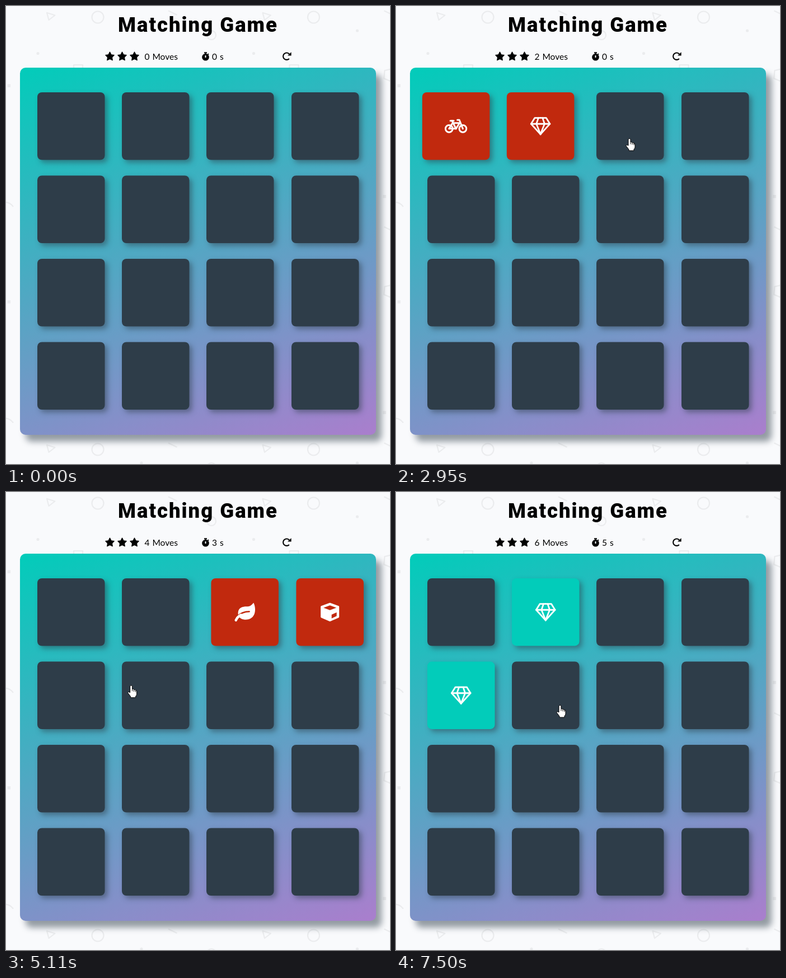
Recreate the animation shown at these times as an HTML page with a canvas. Size 686x817 px, loop 8 s.

```html
<!DOCTYPE html>
<html lang="en">
<head>
<meta charset="utf-8">
<title>Matching Game</title>
<style>
  html, body { margin: 0; width: 100%; height: 100%; overflow: hidden; background: #f9fafc; }
  canvas { display: block; }
</style>
</head>
<body>
<canvas id="stage" width="686" height="817"></canvas>
<script>
const W = 686, H = 817, LOOP = 8000;
const ctx = document.getElementById('stage').getContext('2d');
const PAPER = '#f9fafc', FAINT = '#ebecee', SHADOW = 'rgba(46,61,73,0.5)';
const DARK = '#2e3d49', BLUE = '#02b3e4', RED = '#c1290e', TEAL = '#02ccba';
const SIZE = 120.5, FLIP = 300, JUDGE = 370, EFFECT = 1000;

const faces = ['bike', 'gem', 'leaf', 'cube', 'gem'];
const pairs = [
  { cards: [0, 1], opens: [1450, 2075] },
  { cards: [2, 3], opens: [3060, 4175] },
  { cards: [4, 1], opens: [5680, 6170] }
];
const plays = pairs.flatMap(({ cards, opens }) => cards.map((card, i) => ({
  card, open: opens[i], judge: opens[1] + JUDGE,
  match: faces[cards[0]] === faces[cards[1]]
})));

// Pointer glides: departure, arrival, goal
const glides = [
  { from: 700, to: 1080, x: 137, y: 187 },
  { from: 1460, to: 1620, x: 231, y: 201 },
  { from: 2450, to: 2950, x: 417, y: 236 },
  { from: 3300, to: 3800, x: 576, y: 225 },
  { from: 4680, to: 5300, x: 123, y: 379 },
  { from: 5860, to: 6150, x: 258, y: 236 },
  { from: 6850, to: 7500, x: 293, y: 380 }
];

const clamp = x => Math.min(1, Math.max(0, x));
const mix = (a, b, k) => a + (b - a) * k;
const smooth = x => x * x * (3 - 2 * x);

// CSS "ease": cubic-bezier(.25, .1, .25, 1)
function ease(x) {
  let lo = 0, hi = 1, s = 0.5;
  for (let i = 0; i < 20; i++) {
    if (0.75 * s * (1 - s) + s ** 3 < x) lo = s; else hi = s;
    s = (lo + hi) / 2;
  }
  return 0.3 * s * (1 - s) ** 2 + 3 * s * s * (1 - s) + s ** 3;
}

// Half a turn, seen from the front
const turn = age => Math.cos(Math.PI * (1 - ease(clamp(age / FLIP))));

// Swings left and right ten times, at rest at both ends
function shake(p) {
  const swing = n => n % 10 ? (n % 2 ? -10 : 10) : 0;
  const n = Math.floor(p * 10);
  return mix(swing(n), swing(n + 1), ease(p * 10 - n));
}

// Elastic stretch, fading out
function stretch(p) {
  const stops = [[0, 0], [0.3, 0.25], [0.4, -0.25], [0.5, 0.15], [0.65, -0.05], [0.75, 0.05], [1, 0]];
  const i = stops.findIndex(s => p < s[0]);
  if (i < 1) return 0;
  const [a, b] = [stops[i - 1], stops[i]];
  return mix(a[1], b[1], ease((p - a[0]) / (b[0] - a[0])));
}

function cardState(i, t) {
  const s = { color: DARK, dx: 0, sx: 1, sy: 1, up: false };
  const play = plays.filter(p => p.card === i && t >= p.open).pop();
  if (!play) return s;
  const judged = t - play.judge;
  s.up = true;
  if (judged < 0) {
    s.color = BLUE;
    s.sx = turn(t - play.open);
  } else if (play.match) {
    const k = stretch(judged / EFFECT);
    s.color = TEAL;
    s.sx = 1 + k;
    s.sy = 1 - k;
  } else if (judged < EFFECT) {
    s.color = RED;
    s.dx = shake(judged / EFFECT);
  } else {
    s.up = false;
    s.sx = turn(judged - EFFECT);
  }
  return s;
}

function poly(points, close = true) {
  ctx.beginPath();
  for (const [x, y] of points) ctx.lineTo(x, y);
  if (close) ctx.closePath();
}
function line(...points) { poly(points, false); ctx.stroke(); }
function ring(x, y, r) { ctx.beginPath(); ctx.arc(x, y, r, 0, 7); ctx.stroke(); }
function disc(x, y, r) { ctx.beginPath(); ctx.arc(x, y, r, 0, 7); ctx.fill(); }
function strokePath(d) { ctx.stroke(new Path2D(d)); }
const corners = (n, x, y, radius, a0 = 0) => Array.from({ length: n }, (_, k) => {
  const a = a0 + k * 2 * Math.PI / n, r = radius(k);
  return [x + r * Math.sin(a), y - r * Math.cos(a)];
});

const icons = {
  bike() {
    ctx.lineWidth = 3;
    for (const x of [-12.3, 12.3]) ring(x, 4.6, 6.4);
    line([-12.3, 4.6], [-6, -5.5], [6.5, -5.5], [0, 4.6], [-12.3, 4.6]);
    line([0, 4.6], [-7, -9.5]);
    line([-10, -9.5], [-4, -9.5]);
    line([2.5, -11], [6, -11], [12.3, 4.6]);
  },
  gem() {
    ctx.lineWidth = 2.8;
    for (const m of [-1, 1]) {
      line([0, -14.6], [m * 10.3, -14.6], [m * 16.8, -4], [0, 14.6]);
      line([m * 3.7, -14.6], [m * 7.3, -4], [0, 14.6]);
    }
    line([-16.8, -4], [16.8, -4]);
  },
  leaf(bg) {
    ctx.fill(new Path2D('M15.5-16.8C21-6 20 14 0 13.5C-8 13-13 8-12 0C-11-8-4-10 3-10C9-10 12-12 15.5-16.8Z'));
    ctx.strokeStyle = bg;
    ctx.lineWidth = 2.4;
    strokePath('M-14 8Q-5-1 8-1');
    ctx.strokeStyle = '#fff';
    ctx.lineWidth = 4.4;
    strokePath('M-16 14.5Q-13 8-7 5');
  },
  cube(bg) {
    ctx.lineWidth = 3;
    poly([[0, -15], [15, -9.5], [15, 8.5], [0, 15], [-15, 8.5], [-15, -9.5]]);
    ctx.fill();
    ctx.stroke();
    ctx.fillStyle = bg;
    poly([[-11.5, -7.8], [0, -12], [11.5, -7.8], [0, -3.4]]);
    ctx.fill();
    poly([[3, 4.5], [12, 0.5], [12, 7], [3, 11.2]]);
    ctx.fill();
  }
};

const center = i => [
  Math.floor(56 + (i % 4) * 151.4) + SIZE / 2,
  154 + Math.floor(i / 4) * 148.5 + SIZE / 2
];

function box(x, y, w, h, r, color, ox, oy, blur) {
  ctx.save();
  ctx.shadowColor = SHADOW;
  ctx.shadowOffsetX = ox;
  ctx.shadowOffsetY = oy;
  ctx.shadowBlur = blur;
  ctx.fillStyle = color;
  ctx.beginPath();
  ctx.roundRect(x, y, w, h, r);
  ctx.fill();
  ctx.restore();
}

function drawCard(i, t) {
  const s = cardState(i, t), [cx, cy] = center(i);
  ctx.save();
  ctx.translate(cx + s.dx, cy);
  ctx.scale(s.sx, s.sy);
  box(-SIZE / 2, -SIZE / 2, SIZE, SIZE, 8, s.color, 5 * s.sx, 5 * s.sy, 10);
  if (s.up) {
    ctx.fillStyle = ctx.strokeStyle = '#fff';
    ctx.lineCap = ctx.lineJoin = 'round';
    icons[faces[i]](s.color);
  }
  ctx.restore();
}

function drawTile() {
  ctx.strokeStyle = ctx.fillStyle = FAINT;
  ctx.lineWidth = 2.2;
  poly([[73, 12], [87.5, 16.5], [76.5, 25]]);
  ctx.stroke();
  poly(corners(5, 300, 123, () => 12, 0.4));
  ctx.stroke();
  ring(164, 20, 10.5);
  ring(367, 52, 8);
  line([290, 8.5], [305.5, 16]);
  ctx.strokeRect(121, 105, 16, 16);
  strokePath('M-10 352Q4 346 13 358');
  disc(57, 84.5, 2.6);
  disc(242, 44, 2.6);
  ctx.fillRect(2.5, 139.5, 5.5, 5.5);
  ctx.fillRect(288, 337, 5.5, 5.5);
}

function drawBackdrop() {
  ctx.fillStyle = PAPER;
  ctx.fillRect(0, 0, W, H);
  for (let y = 0; y < 3; y++) for (let x = 0; x < 2; x++) {
    ctx.save();
    ctx.translate(x * 385.5, y * 385.5);
    drawTile();
    ctx.restore();
  }
}

function drawStopwatch(x, y) {
  ctx.save();
  ctx.translate(x, y);
  disc(0, 0, 6.3);
  ctx.fillRect(-2.5, -9, 5, 2);
  ctx.fillRect(-1, -8, 2, 3);
  ctx.lineWidth = 2;
  line([4, -4.5], [5.5, -6]);
  ctx.strokeStyle = PAPER;
  line([0, -3.2], [0, 0.8]);
  ctx.restore();
}

function drawHeader(moves, seconds) {
  ctx.fillStyle = ctx.strokeStyle = '#000';
  ctx.textAlign = 'center';
  ctx.font = '900 36.5px Roboto, sans-serif';
  ctx.letterSpacing = '2px';
  ctx.fillText('Matching Game', 343, 46);
  ctx.letterSpacing = '0px';

  ctx.lineJoin = 'round';
  ctx.lineWidth = 1.2;
  for (let n = 0; n < 3; n++) {
    poly(corners(10, 185.5 + n * 22, 90.2, k => k % 2 ? 4.2 : 8.1));
    ctx.fill();
    ctx.stroke();
  }

  // The narrow "1" pulls the clock to the left.
  const shift = moves === 1 ? -2 : 0;
  ctx.textAlign = 'left';
  ctx.font = '15.5px Lato, sans-serif';
  ctx.wordSpacing = '1px';
  ctx.fillText(moves + ' Moves', 247.5, 95.5);
  ctx.fillText(seconds + ' s', 368 + shift, 95.5);
  ctx.wordSpacing = '0px';
  drawStopwatch(356.5 + shift, 91.3);

  ctx.lineWidth = 2.1;
  ctx.beginPath();
  ctx.arc(501.3, 89.7, 6.2, 0.75, 5.75);
  ctx.stroke();
  poly([[509.6, 82.3], [509.6, 88.6], [503.2, 88.6]]);
  ctx.fill();
}

function drawDeck(t) {
  const g = ctx.createLinearGradient(200.5, 46, 485.5, 829);
  g.addColorStop(0, TEAL);
  g.addColorStop(1, '#aa7ecd');
  box(25, 110, 636, 655, 10, g, 10, 12, 12);
  for (let i = 0; i < 16; i++) drawCard(i, t);
}

// Closed and mismatched cards are clickable.
function overButton(x, y, t) {
  for (let i = 0; i < 16; i++) {
    const [cx, cy] = center(i);
    if (Math.max(Math.abs(x - cx), Math.abs(y - cy)) < SIZE / 2) {
      return [DARK, RED].includes(cardState(i, t).color);
    }
  }
  return false;
}

function pointerAt(t) {
  if (t >= 70 && t < 300) {
    const k = (t - 70) / 230;
    return [mix(550, 150, k), 797 - 140 * Math.sin(Math.PI * k)];
  }
  if (t < glides[0].from) return null;
  let x = 20, y = 222;
  for (const g of glides) {
    const k = smooth(clamp((t - g.from) / (g.to - g.from)));
    x = mix(x, g.x, k);
    y = mix(y, g.y, k);
  }
  return [x, y];
}

const hand = new Path2D('M-2 1.5Q0-1 2 1.5V7Q4 6 5.5 8Q7.5 7 8 9Q10 8.5 10 11V15.5Q10 18 8 19.5V22H-1V20L-6 13.5Q-6 10.5-2 13Z');
const arrow = new Path2D('M0 0V16.5L3.8 13L6.5 19L9.2 17.8L6.5 12H11.8Z');

function drawPointer(t) {
  const at = pointerAt(t);
  if (!at) return;
  const over = overButton(...at, t), shape = over ? hand : arrow;
  ctx.save();
  ctx.translate(...at);
  ctx.fillStyle = '#fff';
  ctx.strokeStyle = '#000';
  ctx.lineWidth = 1;
  ctx.lineJoin = 'round';
  ctx.fill(shape);
  ctx.stroke(shape);
  if (over) for (const x of [2, 5, 8]) line([x, 7 + x / 4], [x, 10 + x / 4]);
  ctx.restore();
}

function draw(t) {
  const moves = plays.filter(p => t >= p.open).length;
  const seconds = Math.max(0, Math.floor((t - 2030) / 1000));
  drawBackdrop();
  drawHeader(moves, seconds);
  drawDeck(t);
  drawPointer(t);
}

const start = performance.now();
function tick() {
  draw((performance.now() - start) % LOOP);
  requestAnimationFrame(tick);
}
tick();
</script>
</body>
</html>
```
